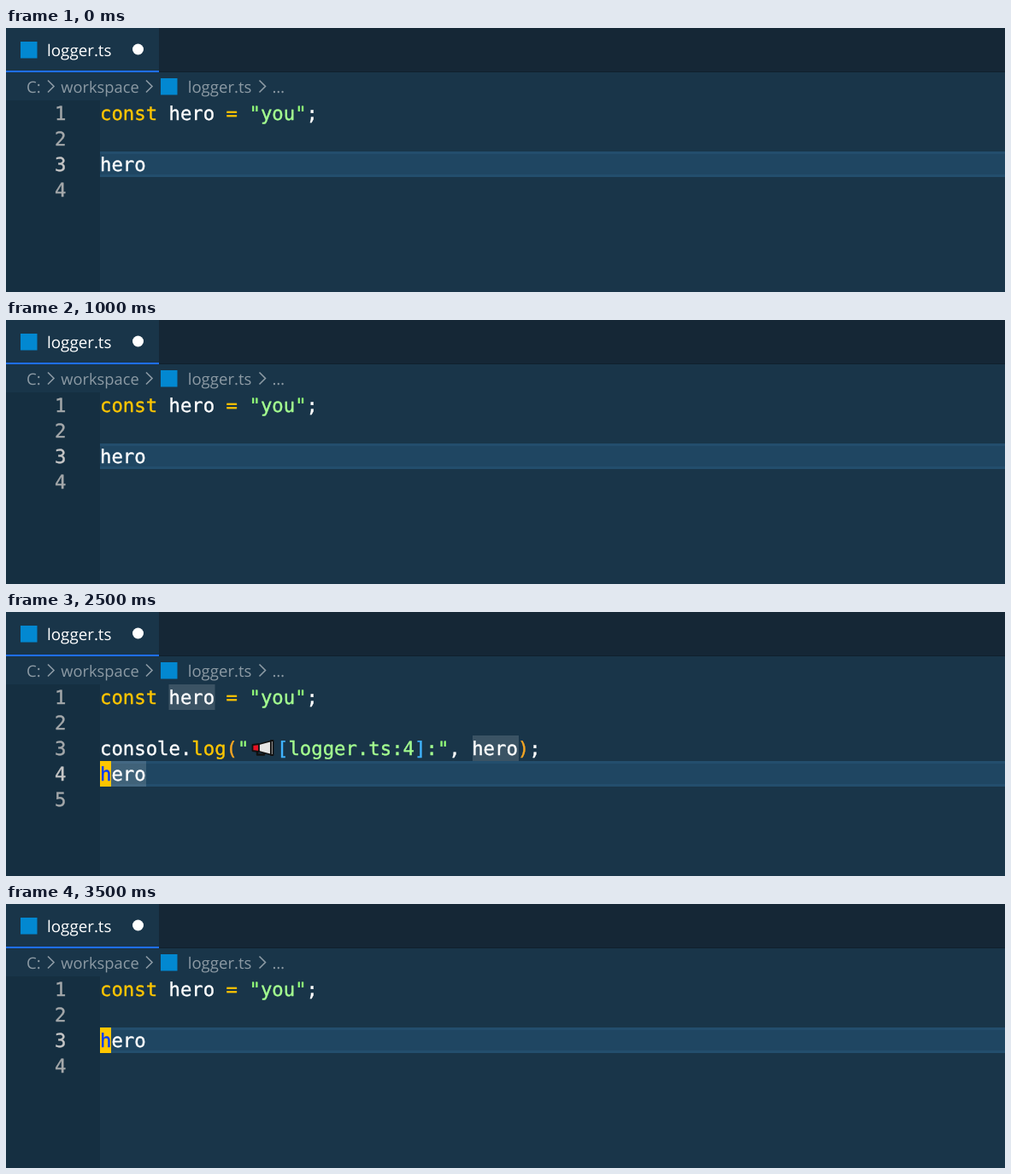
Recreate the animation shown at these times as an HTML page. Size 1169 by 310 pixels, loop 4000 ms.

```html
<!DOCTYPE html>
<html lang="en">
<head>
<meta charset="utf-8">
<title>logger.ts</title>
<style>
  html, body { margin: 0; width: 100%; height: 100%; overflow: hidden; background: #193549; }
  svg { display: block; width: 1169px; height: 310px; }
  text { white-space: pre; text-rendering: geometricPrecision; }
  .ui { font: 18.6px "Open Sans", "Noto Sans", sans-serif; fill: #8c9aa4; }
  .code { font: 22.29px "DejaVu Sans Mono", "Noto Sans Mono", monospace; stroke-width: .4; }
  .chevron { fill: none; stroke: #8c9aa4; stroke-width: 1.6; }
</style>
</head>
<body>
<svg viewBox="0 0 1169 310">
  <rect width="1169" height="310" fill="#193549"/>
  <rect x="179" width="990" height="52" fill="#152736"/>
  <rect x="179" y="51" width="990" height="1" fill="#10202d"/>
  <rect y="50" width="179" height="2" fill="#1f6fff"/>
  <rect x="17" y="16" width="19.500" height="19.500" fill="#0288d1"/>
  <text class="ui" x="48" y="33" style="fill:#fff;font-size:18.8px">logger.ts</text>
  <circle cx="154.5" cy="25" r="6.5" fill="#fff"/>

  <text class="ui" x="24" y="76">C:</text>
  <text class="ui" x="64.3" y="76" style="font-size:18.3px">workspace</text>
  <rect x="181" y="59" width="19.500" height="19.500" fill="#0288d1"/>
  <text class="ui" x="212.7" y="76">logger.ts</text>
  <text class="ui" x="311.5" y="76">…</text>
  <path class="chevron" d="M49 61.5l7 7-7 7M164 61.5l7 7-7 7M296.500 61.5l7 7-7 7"/>

  <rect y="85" width="110" height="225" fill="#152f41"/>
  <g id="editor"></g>
</svg>
<script>
const LEFT = 110, TOP = 85, ROW = 30, CHAR = 13.42, STEP = 500;
const WHITE = "#fff", GOLD = "#ffc600", QUOTE = "#92fc79",
      STRING = "#a5ff90", PAREN = "#f5a623", BRACKET = "#40b4ff";
const editor = document.getElementById("editor");

const rect = (x, y, w, h, fill) =>
  `<rect x="${x}" y="${y}" width="${w}" height="${h}" fill="${fill}"/>`;
const glyphs = (x, row, text, fill) =>
  `<text class="code" x="${x.toFixed(2)}" y="${TOP + row * ROW + 23}" fill="${fill}" stroke="${fill}">${text}</text>`;

// Alternating text and colour, laid out on the character grid.
function tokens(x, row, ...parts) {
  let out = "";
  for (let i = 0; i < parts.length; i += 2) {
    out += glyphs(x, row, parts[i], parts[i + 1]);
    x += parts[i].length * CHAR;
  }
  return out;
}

const assignment = tokens(LEFT, 0, "const", GOLD, " hero", WHITE, " =", GOLD,
  ' "', QUOTE, "you", STRING, '"', QUOTE, ";", WHITE);

const logCall =
  tokens(LEFT, 2, "console.", WHITE, "log", GOLD, "(", PAREN, '"', QUOTE) +
  tokens(317, 2, "[", BRACKET, "logger.ts:4", STRING, "]", BRACKET, ":", STRING,
    '"', QUOTE, ",", WHITE, " hero", WHITE, ")", PAREN, ";", WHITE);

const megaphone = `<g stroke="#111" stroke-width="1.8" stroke-linejoin="round">
  <path d="M294 163v4.500h8v-4" fill="none" stroke-width="2.4"/>
  <path d="M295 155.500l15-4v16l-15-4z" fill="#e4e4e4"/>
  <path d="M288.500 156l7.500-1v9l-7.500-1z" fill="#e81224"/>
  <path d="M310 151h2.500v17h-2.500z" fill="#e4e4e4"/></g>`;

function scene(logged, cursor, marked) {
  const row = logged ? 3 : 2, y = TOP + row * ROW;
  let out = rect(LEFT, y, 1059, ROW, "#234e6d") + rect(LEFT, y + 3, 1059, ROW - 6, "#1f4662");
  if (marked) {
    const mark = (x, r) => rect(x, TOP + r * ROW, 54, ROW, "rgba(255,255,255,.15)");
    out += mark(190.5, 0) + mark(546, 2) + mark(LEFT, 3);
  }
  for (let i = 0; i < row + 2; i++)
    out += glyphs(57, i, i + 1, i === row ? "#c6c6c6" : "#a4a8aa");
  out += assignment;
  if (logged) out += logCall + megaphone;
  if (cursor) out += rect(LEFT, y, 13, ROW, GOLD);
  return out + tokens(LEFT, row, "h", cursor ? "#0039ff" : WHITE, "ero", WHITE);
}

let shown = -1;
function draw(ms) {
  const step = Math.floor(ms / STEP) % 8;
  if (step !== shown) {
    shown = step;
    const logged = step >= 3 && step < 7;
    const cursor = step !== 0 && step !== 2 && step !== 6;
    editor.innerHTML = scene(logged, cursor, step === 5 || step === 6);
  }
}

const start = performance.now();
function tick() {
  draw(performance.now() - start);
  requestAnimationFrame(tick);
}
tick();
</script>
</body>
</html>
```
